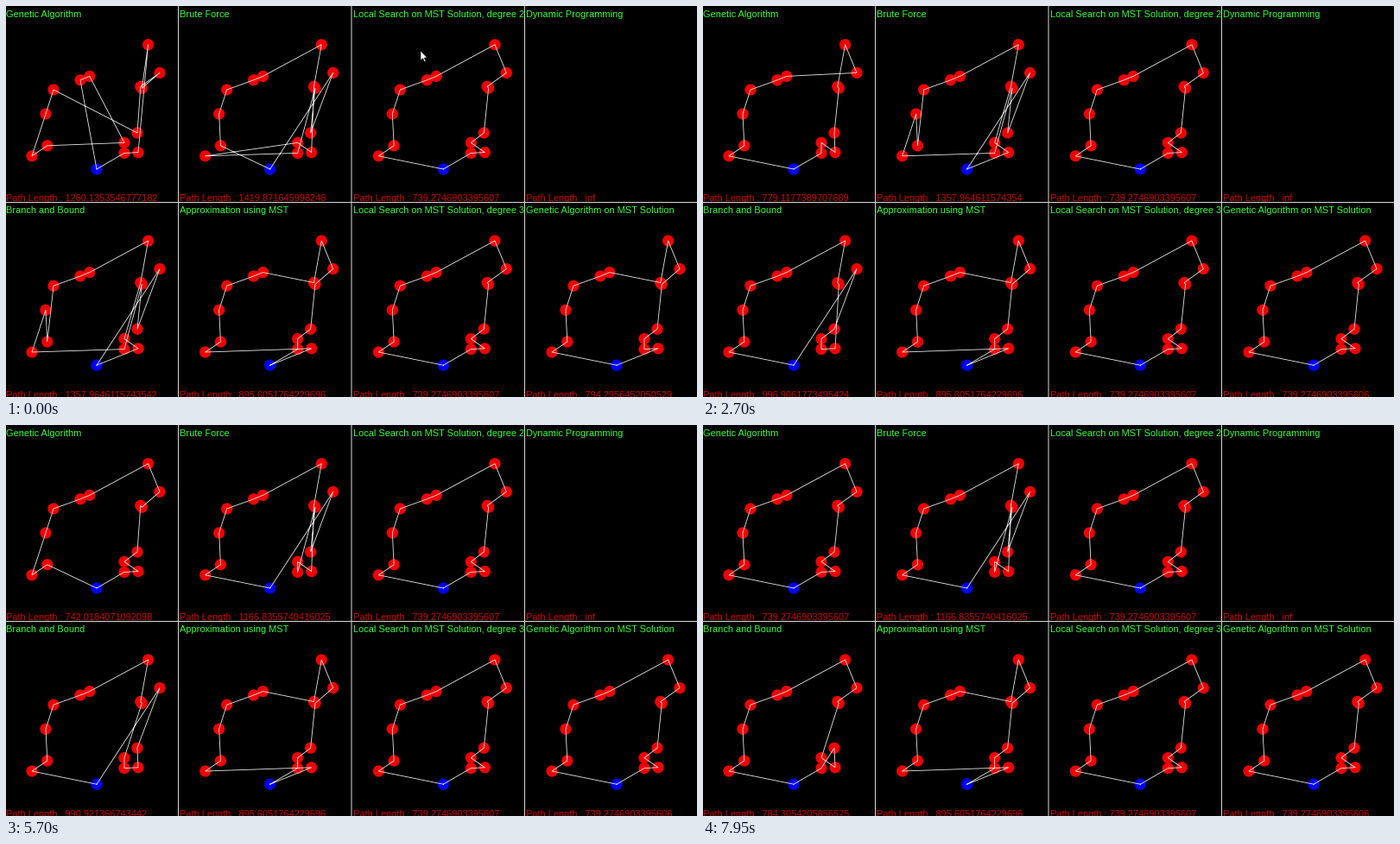
A matplotlib script for the animation above (8000 ms loop, 800 by 453 pixels).

```python
import math

import matplotlib.pyplot as plt
from matplotlib.animation import FuncAnimation
from matplotlib.patches import Circle, Polygon

W, H, DPI = 800, 453, 100
STEP, FRAMES = 50, 160
PX = 72 / DPI
COL_W, ROW_H = 602 / 3, 227.2
SCALE = 1.495

CITIES = {
    "S": (105, 189), "A": (164.6, 44.8), "B": (178, 77.4), "C": (155.8, 93.3),
    "D": (157.3, 95.2), "E": (152, 147), "F": (137, 158.4), "G": (137, 170.4),
    "H": (153, 169.6), "I": (47.8, 161.8), "J": (30, 173.8), "K": (46, 125),
    "L": (55, 97), "M": (86, 85.8), "N": (96.8, 81.4),
}

LEFT = "SJIKLMN"
BEST = LEFT + "ABCDEFHG"
WORST = "SHFCANMLIKJGDEB"
BETTER = "SHFCANMLKIJGDEB"

# Each step: start in ms, tour, shown length (None: measure the tour).
GENETIC = [
    (0, "SMNFIJKLECBDAHG", "1260.1353546777182"),
    (200, LEFT + "FECBDAHG", None),
    (450, LEFT + "DABCEHFG", None),
    (750, LEFT + "DABCEFGH", None),
    (1200, LEFT + "DABCEFHG", "789.9202499180201"),
    (2100, LEFT + "BACDEHFG", "779.1177389707689"),
    (3300, "SIJKLMNABDCEHFG", "742.2534779932184"),
    (5250, "SIJKLMNABDCEFHG", "742.0184071092098"),
    (6200, LEFT + "ABDCEFHG", "741.5316456618445"),
    (7300, BEST, "739.2746903395607"),
]
BRUTE = [
    (0, "SIKLMNACHFJGDEB", "1419.871645998248"),
    (500, WORST, "1357.964611574354"),
    (4400, BETTER, "1259.0875673413202"),
    (5400, LEFT + "ACHFGDEB", "1166.8355740416025"),
]
BRANCH = [
    (0, WORST, "1357.9646115743542"),
    (700, BETTER, "1259.0875673413202"),
    (1100, LEFT + "ACHFGDEB", "1166.8355740416025"),
    (1400, LEFT + "ACFGHDEB", "1143.3452371586015"),
    (2200, LEFT + "ACDHGFEB", "996.9061773495424"),
    (2850, LEFT + "ACDFGHEB", "990.921366743442"),
    (6900, "SHFIJKLMNDCABEG", "891.5277969921161"),
    (7400, LEFT + "ABCDFEHG", None),
    (7750, LEFT + "ABCDFHEG", "784.3054205856575"),
]
MST = [(0, "SHJIKLMNCABDEFG", "895.6051764229696")]
LOCAL = [(0, BEST, "739.2746903395607")]
GENETIC_MST = [
    (0, LEFT + "CABDEFGH", "794.2956452050529"),
    (650, LEFT + "ABCDEHFG", "739.5097612235691"),
    (2050, BEST, "739.2746903395606"),
]

PANELS = [
    ("Genetic Algorithm", GENETIC),
    ("Brute Force", BRUTE),
    ("Local Search on MST Solution, degree 2", LOCAL),
    ("Dynamic Programming", [(0, "", "inf")]),
    ("Branch and Bound", BRANCH),
    ("Approximation using MST", MST),
    ("Local Search on MST Solution, degree 3", LOCAL),
    ("Genetic Algorithm on MST Solution", GENETIC_MST),
]


def closed(tour):
    return [CITIES[c] for c in tour + tour[:1]]


def measure(tour):
    pts = closed(tour)
    return str(round(SCALE * sum(map(math.dist, pts, pts[1:])), 13))


def pixel_axes(x, y, w, h):
    ax = fig.add_axes([x / W, 1 - (y + h) / H, w / W, h / H])
    ax.set(xlim=(0, w), ylim=(h, 0))
    ax.axis("off")
    return ax


class Panel:
    def __init__(self, index, title, steps):
        row, col = divmod(index, 4)
        ax = pixel_axes(col * COL_W, row * ROW_H, 200, 227)
        self.steps = [(t, tour, n or measure(tour)) for t, tour, n in steps]
        if steps[0][1]:
            for name, pos in CITIES.items():
                color = "#0000f5" if name == "S" else "#f00000"
                ax.add_patch(Circle(pos, 6.6, color=color, lw=0))
        self.path, = ax.plot([], [], color="#e8e8e8", lw=0.85 * PX, zorder=3)
        font = dict(family="Liberation Sans", size=11 * PX, clip_on=True, zorder=4)
        ax.text(0.2, 12.6, title, color="#33ff33", **font)
        self.label = ax.text(0.2, 226.4, "", color="#d00000", **font)

    def show(self, ms):
        _, tour, length = [s for s in self.steps if s[0] <= ms][-1]
        pts = closed(tour)
        self.path.set_data([p[0] for p in pts], [p[1] for p in pts])
        self.label.set_text(f"Path Length : {length}")


fig = plt.figure(figsize=(W / DPI, H / DPI), dpi=DPI, facecolor="black")
panels = [Panel(i, *p) for i, p in enumerate(PANELS)]

top = pixel_axes(0, 0, W, H)
rule = dict(color="#d8d8d8", lw=PX, snap=False)
for x in (199.5, 400, 600.5):
    top.plot([x, x], [0, H], **rule)
top.plot([0, W], [227.5, 227.5], **rule)

ARROW = [(0, 0), (0, 11), (2.6, 8.6), (4.4, 12.6), (6, 11.8), (4.2, 8), (7.7, 8)]
cursor = top.add_patch(Polygon(ARROW, fc="white", ec="black", lw=0.5 * PX, zorder=5))


def draw(i):
    ms = i * STEP
    for panel in panels:
        panel.show(ms)
    k = min(max((ms - 100) / 500, 0), 1)
    k = k * k * (3 - 2 * k)
    cursor.set_xy([(480 + x - 8 * k, 52 + y - 70 * k) for x, y in ARROW])
    return []


anim = FuncAnimation(fig, draw, frames=FRAMES, interval=STEP, repeat=True,
                     repeat_delay=0, blit=False)
plt.show()
```
